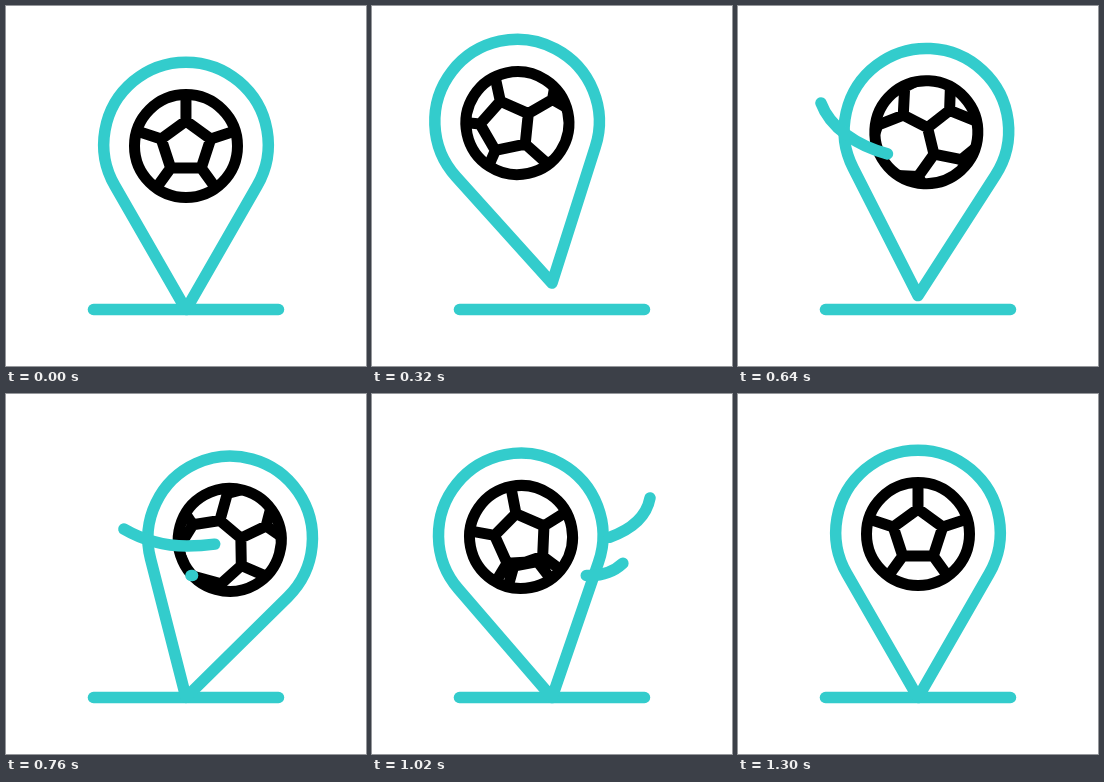
Recreate the animation shown at these times as an HTML page. Size 360x360 px, loop 2400 ms.

```html
<!DOCTYPE html>
<html lang="en">
<head>
<meta charset="utf-8">
<title>Football pin</title>
<style>
html, body { margin: 0; width: 100%; height: 100%; overflow: hidden; background: #fff; }
svg { display: block; width: 100vw; height: 100vh; }
path, circle { fill: none; stroke-linecap: round; stroke-linejoin: round; }
.teal { stroke: #33cccc; stroke-width: 11.5; }
.ball { stroke: #000; stroke-width: 11; }
</style>
</head>
<body>
<svg viewBox="0 0 360 360">
  <defs><clipPath id="rim"><circle r="55"/></clipPath></defs>
  <path class="teal" d="M87.5 303.5H272.5"/>
  <g id="pin">
    <path class="teal" d="M0 0L-71.2 -124A82.25 82.25 0 1 1 71.2 -124Z"/>
    <g class="ball" transform="translate(0 -163.6)">
      <circle r="51.5"/>
      <path id="seams" clip-path="url(#rim)"/>
    </g>
  </g>
  <path id="orbit" class="teal" pathLength="1" d="M83 97C95 130 140 152 181 152C230 152 272 136 278 104"/>
  <path id="trail" class="teal" pathLength="1" d="M185 181.500H218C236 181.500 250 174 260 158"/>
</svg>
<script>
const LOOP = 2400;
const [pin, seams, orbit, trail] = ['pin', 'seams', 'orbit', 'trail'].map(id => document.getElementById(id));

const linear = u => u;
const smooth = u => u * u * (3 - 2 * u);
const mix = (a, b, u) => a + (b - a) * u;
const ramp = (t, from, to) => Math.min(1, Math.max(0, (t - from) / (to - from)));

// Keys are [time, value] pairs.
function at(keys, t, ease = linear) {
  const i = keys.findIndex(([time]) => t < time);
  if (i < 0) return keys[keys.length - 1][1];
  if (i === 0) return keys[0][1];
  const [t0, a] = keys[i - 1], [t1, b] = keys[i];
  return mix(a, b, ease((t - t0) / (t1 - t0)));
}

const tilt = [[0, 0], [472, -16.1], [770, 15.6], [1030, -11], [1300, 0]];
const lift = [[0, 0], [472, 35], [770, 0]];
const slide = [[0, 0], [480, -18], [640, -24], [900, -4], [1040, 0]];

function step([x, y], angle, length) {
  const a = angle * Math.PI / 180;
  return [x + length * Math.cos(a), y + length * Math.sin(a)];
}
const points = list => 'M' + list.map(p => p.map(v => v.toFixed(2)).join(' ')).join('L');

// The central panel opens from five sides to seven and closes again:
// at a gap of 72 degrees the two outer corners coincide with their neighbours.
function seamPath(t) {
  const open = ramp(t, 480, 640) - ramp(t, 900, 1040);
  const center = [at(slide, t), mix(1, 17, open)];
  const gap = mix(72, 49, open), radius = mix(26, 33, open);
  const corners = [];
  let d = '';
  for (let i = -3; i <= 3; i++) {
    const angle = i * gap - 90;
    const corner = step(center, angle, radius);
    const fork = step(corner, angle, 28);
    corners.push(corner);
    d += points([corner, fork]) + points([step(fork, angle - 50, 26), fork, step(fork, angle + 60, 30)]);
  }
  return d + points(corners) + 'Z';
}

function trim(path, tail, head) {
  const shown = head > tail;
  path.style.display = shown ? '' : 'none';
  if (!shown) return;
  path.setAttribute('stroke-dasharray', `${Math.max(head - tail, 0.001)} 3`);
  path.setAttribute('stroke-dashoffset', -tail);
}

function draw(t) {
  const y = 303.6 - at(lift, t, smooth);
  pin.setAttribute('transform', `translate(180 ${y}) rotate(${at(tilt, t, smooth)})`);
  seams.setAttribute('d', seamPath(t));
  trim(orbit, ramp(t, 650, 1146), ramp(t, 466, 940));
  trim(trail, ramp(t, 908, 1230), ramp(t, 755, 1077));
}

const start = performance.now();
function tick() {
  draw((performance.now() - start) % LOOP);
  requestAnimationFrame(tick);
}
draw(0);
requestAnimationFrame(tick);
</script>
</body>
</html>
```
